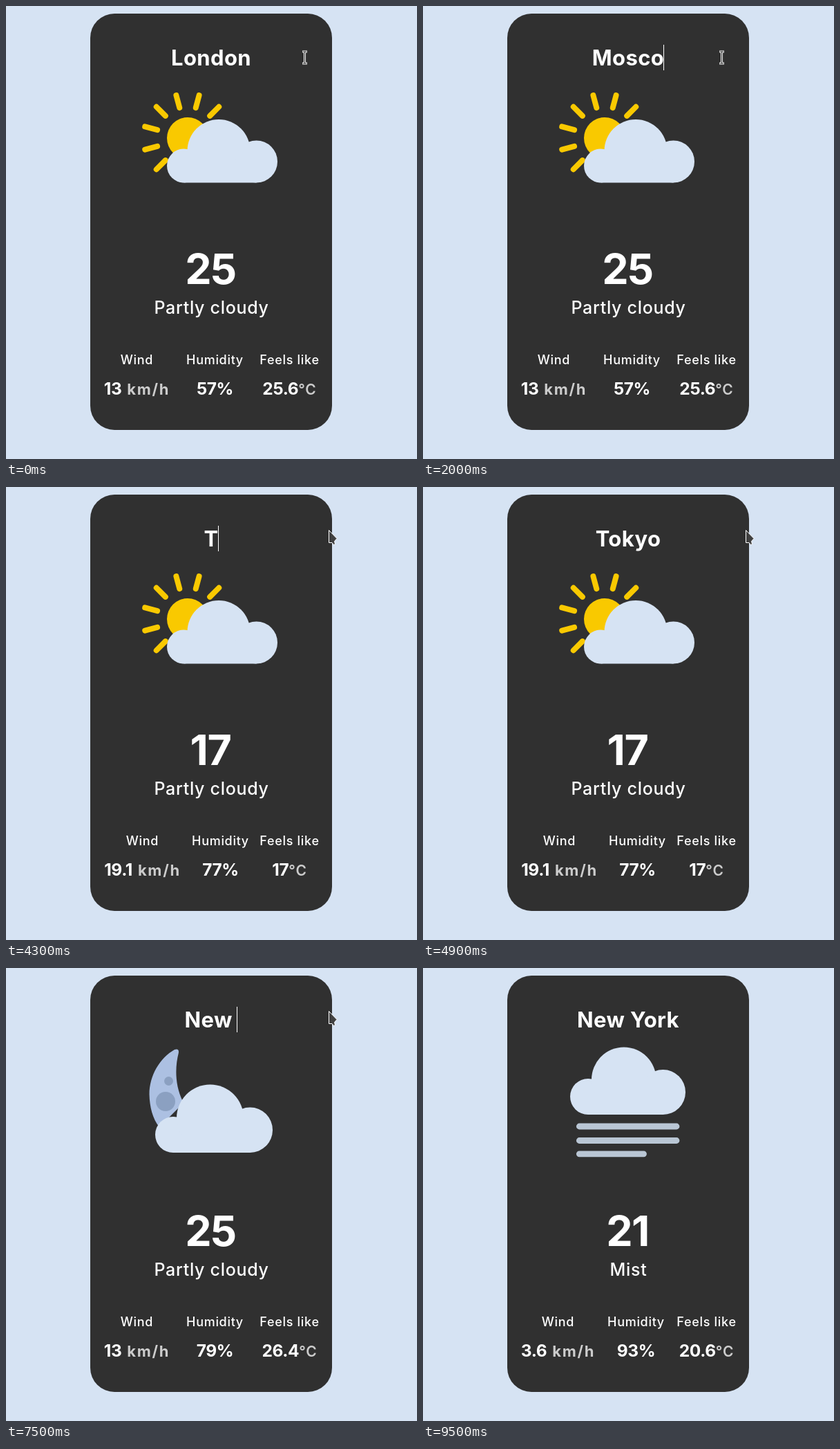
Write an HTML page that moves like this. It is 595 px wide and 655 px high and loops after 9.7 s.

```html
<!DOCTYPE html>
<html lang="en">
<head>
<meta charset="utf-8">
<title>Weather card</title>
<style>
  html, body { margin: 0; width: 100%; height: 100%; overflow: hidden; background: #d6e3f3; }
  body { position: relative; font-family: Inter, "Open Sans", sans-serif; }
  svg { position: absolute; left: 0; top: 0; display: block; }
  text { fill: #fff; text-anchor: middle; white-space: pre; }
  .temp { font-size: 61px; font-weight: 700; letter-spacing: -1.5px; }
  .sky { font-size: 25px; font-weight: 500; letter-spacing: .7px; }
  .label { font-size: 18px; font-weight: 500; letter-spacing: .7px; }
  .value { font-size: 24.5px; font-weight: 700; letter-spacing: -.4px; }
  .unit { font-size: 22px; font-weight: 700; fill: #ccc; letter-spacing: 1.7px; }
  .degree { font-size: 21px; font-weight: 600; fill: #ccc; letter-spacing: .8px; }
  .cloud { fill: #d6e3f3; }
  .title {
    position: absolute; left: 122px; top: 56px; width: 350px; height: 37px;
    text-align: center; color: #fff; font-size: 31px; font-weight: 700;
    line-height: 37px; letter-spacing: .4px;
  }
  .title span {
    position: relative; display: inline-block; height: 37px;
    vertical-align: top; white-space: pre;
  }
  .title .caret::after {
    content: ""; position: absolute; left: calc(100% - 1px); top: 0;
    width: 1px; height: 37px; background: #fff;
  }
</style>
</head>
<body>
<svg width="595" height="655" viewBox="0 0 595 655">
  <rect x="122" y="11" width="350" height="602" rx="35" fill="#303030"/>

  <g id="day">
    <circle cx="263" cy="191" r="30" fill="#f9c900"/>
    <g id="rays" stroke="#f9c900" stroke-width="8" stroke-linecap="round"></g>
  </g>
  <g id="night">
    <path fill="#acc0e2" d="M249.8 123C245 142 243.500 169 257 195L222 230C212 218 208 200 207.500 183C207.500 155 223 130 244 118Q251 115.500 249.800 123Z"/>
    <g fill="#8ba0c1">
      <circle cx="235.500" cy="163.500" r="6.500"/>
      <circle cx="231" cy="193" r="14"/>
    </g>
  </g>
  <g id="mist">
    <path d="M226.300 229H367M226.300 249.500H367M226.300 268.800H319.500" stroke="#b9c6d4" stroke-width="8.800" stroke-linecap="round"/>
  </g>

  <text id="temp" class="temp" x="296" y="402"></text>
  <text id="sky" class="sky" x="297.500" y="445"></text>
  <text id="windLabel" class="label" y="518">Wind</text>
  <text id="humidLabel" class="label" y="518">Humidity</text>
  <text class="label" x="410.500" y="518">Feels like</text>
  <text id="windValue" class="value" y="562"><tspan id="wind"></tspan><tspan class="unit" dx="8">km/h</tspan></text>
  <text id="humid" class="value" y="562"></text>
  <text class="value" x="410.500" y="562"><tspan id="feels"></tspan><tspan class="degree">°C</tspan></text>
</svg>

<div class="title"><span id="city"></span></div>

<svg width="595" height="655" viewBox="0 0 595 655">
  <g id="beam" fill="none">
    <path d="M-3.500-8.500H3.500M0-8.500V8.500M-3.500 8.500H3.500" stroke="#fff" stroke-width="3"/>
    <path d="M-3-8.500H3M0-8.500V8.500M-3 8.500H3" stroke="#222"/>
  </g>
  <path id="arrow" d="M.5.5V18.500H5L7.500 21.500 9.500 20.500 8.500 16.500 12 12.500Z" fill="#404040" stroke="#fff"/>
</svg>

<script>
const LOOP = 9700;
const $ = id => document.getElementById(id);

function add(parent, tag, attrs) {
  const el = document.createElementNS('http://www.w3.org/2000/svg', tag);
  for (const key in attrs) el.setAttribute(key, attrs[key]);
  parent.append(el);
}

// Three puffs given as [cx, cy, r], joined by a flat base
function cloud(icon, left, middle, right) {
  const g = $(icon);
  for (const [cx, cy, r] of [left, middle, right]) add(g, 'circle', { cx, cy, r, class: 'cloud' });
  add(g, 'rect', {
    x: left[0], y: left[1], width: right[0] - left[0], height: left[2], class: 'cloud'
  });
}

for (let deg = 135; deg <= 315; deg += 30) {
  const a = deg * Math.PI / 180, c = Math.cos(a), s = Math.sin(a);
  add($('rays'), 'line', {
    x1: 263 + 45.5 * c, y1: 191 + 45.5 * s, x2: 263 + 64 * c, y2: 191 + 64 * s
  });
}
cloud('day', [257.5, 231, 24.5], [308, 209.5, 45.5], [362.5, 225, 30.5]);
cloud('night', [242, 241, 26], [295.5, 217, 48.5], [353.3, 234.2, 32.7]);
cloud('mist', [239, 186, 26], [290.8, 161.3, 46.8], [347.5, 179.5, 32.5]);

// Field text; "|" marks a visible caret
const typing = [
  [0, 'London'], [300, 'Londo|'], [500, 'Londo'], [900, 'Lon|'], [1000, 'L|'], [1100, ''],
  [1500, 'M|'], [1600, 'Mo|'], [1800, 'Mos|'], [1900, 'Mosc|'], [2000, 'Mosco|'],
  [2100, 'Moscow|'], [2700, 'Moscow'],
  [3200, 'Mosco|'], [3300, 'Mosco'], [3800, 'Mos|'], [3900, 'M|'], [4000, ''],
  [4300, 'T|'], [4400, 'To|'], [4500, 'Tok|'], [4700, 'Tokyo|'], [4900, 'Tokyo'],
  [5500, 'Toky|'], [5700, 'Toky'], [6100, 'Tok|'], [6200, 'T|'], [6400, '|'], [6700, ''],
  [7100, 'N|'], [7200, 'Ne|'], [7400, 'New|'], [7500, 'New |'], [7800, 'New Y|'],
  [7900, 'New Yo|'], [8100, 'New Yor|'], [8200, 'New York|'], [8800, 'New York']
];

const reports = [
  [0, { icon: 'day', temp: 25, sky: 'Partly cloudy', wind: '13', humid: '57%', feels: '25.6', x: 189.5 }],
  [2300, { icon: 'day', temp: 17, sky: 'Partly cloudy', wind: '19.1', humid: '77%', feels: '17', x: 197.5 }],
  [5200, { icon: 'night', temp: 25, sky: 'Partly cloudy', wind: '13', humid: '79%', feels: '26.4', x: 189.5 }],
  [8400, { icon: 'mist', temp: 21, sky: 'Mist', wind: '3.6', humid: '93%', feels: '20.6', x: 195.5 }]
];

const pointer = [
  [0, ['beam', 432.5, 74.5]], [2700, ['beam', 443.5, 77.5]], [2800, ['beam', 457.5, 80.5]],
  [2900, ['arrow', 468, 77]], [3000, ['arrow', 467, 62]],
  [9000, ['arrow', 440, 52]], [9100, ['arrow', 372, 36]], [9200, ['arrow', 270, 18]],
  [9300, ['arrow', 152, 2]], [9500, ['none', 0, 0]]
];

const at = (track, t) => track.findLast(step => step[0] <= t)[1];
const show = (id, on) => $(id).setAttribute('visibility', on ? 'visible' : 'hidden');

function drawReport(r) {
  for (const icon of ['day', 'night', 'mist']) show(icon, icon === r.icon);
  for (const key of ['temp', 'sky', 'wind', 'humid', 'feels']) $(key).textContent = r[key];
  for (const id of ['windLabel', 'windValue']) $(id).setAttribute('x', r.x);
  for (const id of ['humidLabel', 'humid']) $(id).setAttribute('x', r.x + 113);
}

function drawCity(text) {
  $('city').textContent = text.replace('|', '');
  $('city').className = text.endsWith('|') ? 'caret' : '';
}

function drawPointer([kind, x, y]) {
  for (const id of ['beam', 'arrow']) {
    show(id, id === kind);
    $(id).setAttribute('transform', `translate(${x} ${y})`);
  }
}

const layers = [[typing, drawCity], [reports, drawReport], [pointer, drawPointer]];
const current = [];
const start = performance.now();

function frame() {
  const t = (performance.now() - start) % LOOP;
  layers.forEach(([track, draw], i) => {
    const state = at(track, t);
    if (state !== current[i]) draw(current[i] = state);
  });
  requestAnimationFrame(frame);
}
frame();
</script>
</body>
</html>
```
